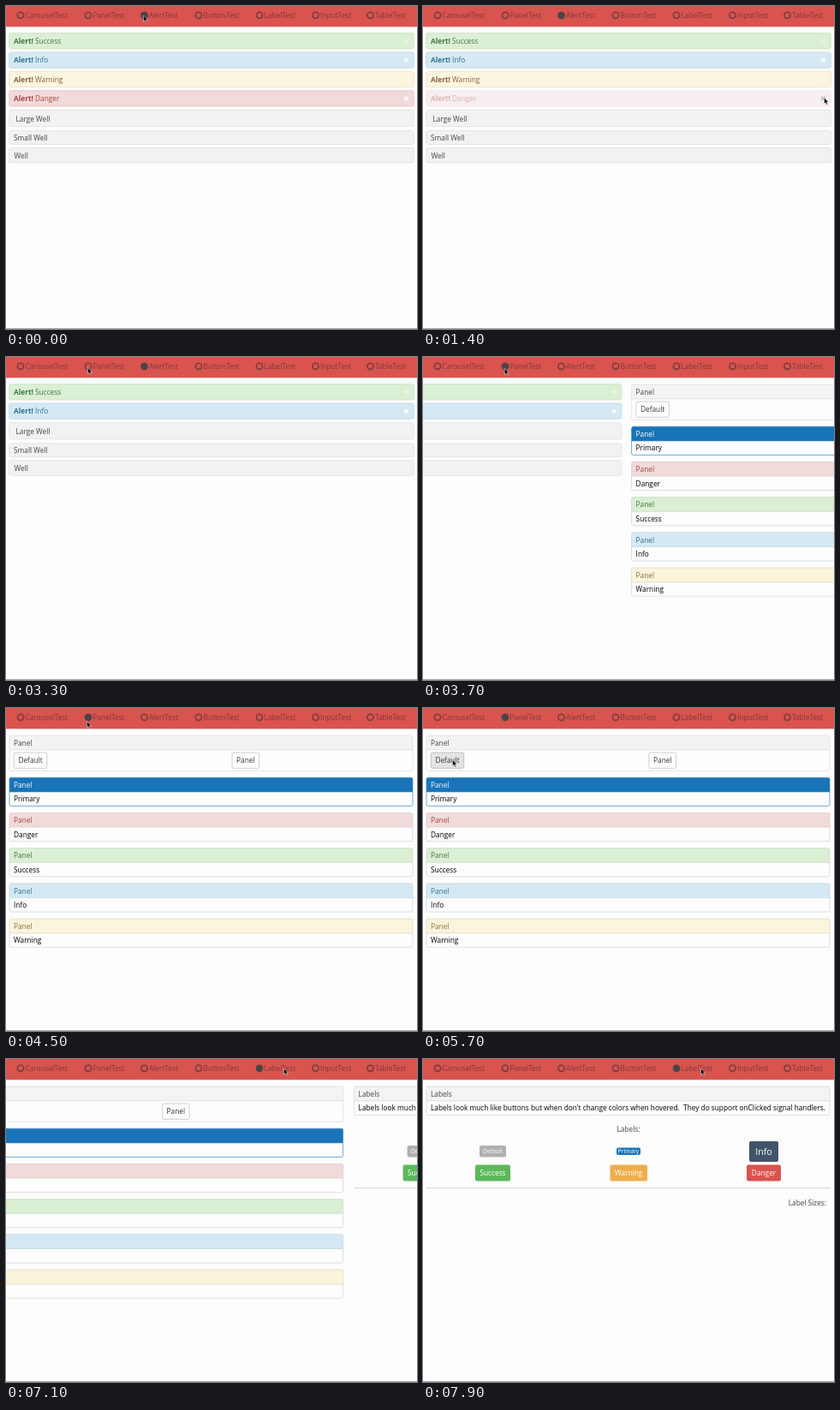
Write an HTML page that moves like this. It is 480 by 377 pixels and loops after 8 s.

```html
<!DOCTYPE html>
<html lang="en">
<head>
<meta charset="utf-8">
<style>
html, body { margin: 0; width: 100%; height: 100%; overflow: hidden; background: #fdfdfd; }
svg { display: block; width: 480px; height: 377px; font: 8.3px "Open Sans", sans-serif; }
text { white-space: pre; }
</style>
</head>
<body>
<svg id="stage" viewBox="0 0 480 377"></svg>
<script>
const LOOP = 8000, PITCH = 484, ROW = 22.35, HAIR = 0.7;
const stage = document.getElementById('stage');

function add(parent, tag, attrs = {}, text = '') {
  const el = document.createElementNS('http://www.w3.org/2000/svg', tag);
  for (const key in attrs) el.setAttribute(key, attrs[key]);
  el.textContent = text;
  parent.append(el);
  return el;
}
const group = parent => add(parent, 'g');
const box = (g, x, y, width, height, fill, stroke = 'none', rx = 2) =>
  add(g, 'rect', { x, y, width, height, fill, stroke, rx, 'stroke-width': HAIR });
const label = (g, x, mid, text, fill = '#444', extra = {}) =>
  add(g, 'text', { x, y: mid + 3, fill, ...extra }, text);
const move = (g, x, y) => g.setAttribute('transform', `translate(${x} ${y})`);

// Alert page
const alertPage = group(stage);
const alerts = [
  ['Success', '#dbefd5', '#c8dfba', '#3c763d', 0.4],
  ['Info', '#d5e9f4', '#b3d8e6', '#31708f', 1],
  ['Warning', '#fbf5df', '#f0e0bc', '#8a5f3b', 0.5],
  ['Danger', '#f0dada', '#e2bfc5', '#a94442', 1]
].map(([name, fill, edge, ink, crossAlpha], i) => {
  const g = group(alertPage), mid = 41 + ROW * i;
  box(g, 3.7, mid - 9.4, 472.6, 18.4, fill, edge);
  const line = label(g, 9, mid, '', ink);
  add(line, 'tspan', { 'font-weight': 700 }, 'Alert!');
  add(line, 'tspan', {}, ' ' + name);
  const cross = add(g, 'path', {
    d: `M465.3 ${mid - 2.2}l4.4 4.4m0 -4.4l-4.4 4.4`,
    stroke: '#fff', 'stroke-width': 1.6, opacity: crossAlpha
  });
  return { g, cross, mid };
});
const wells = group(alertPage);
[['Large Well', 11.5, 121.5, 19, 131.5], ['Small Well', 9, 145.5, 16, 153.7], ['Well', 9.5, 165.5, 17.5, 174.5]]
  .forEach(([text, x, y, h, mid]) => {
    box(wells, 3.7, y, 472.6, h, '#f2f2f2', '#dedede');
    label(wells, x, mid, text);
  });

// Panels
function panel(g, y, h, title, fill, edge, ink, body) {
  add(g, 'path', { d: `M4 ${y + 16.7}V${y + 2}q0 -2 2 -2h467q2 0 2 2v14.7z`, fill });
  add(g, 'path', { d: `M4 ${y + 16.7}h471`, stroke: edge, 'stroke-width': HAIR });
  box(g, 4, y, 471, h, 'none', edge);
  label(g, 9, y + 8.8, title, ink);
  if (body) label(g, 9, y + 25.1, body, '#000');
}
const panelPage = group(stage);
panel(panelPage, 32.2, 41.2, 'Panel', '#f3f3f3', '#dcdcdc', '#444');
const buttons = [['Default', 9.3, 38.4], ['Panel', 264, 31.5]].map(([text, x, w]) => {
  const rect = box(panelPage, x, 52.1, w, 18.2, '#fff', '#bbb');
  label(panelPage, x + w / 2, 61, text, '#333', { 'text-anchor': 'middle' });
  return { rect, x, w };
});
[
  ['Primary', '#1974b8', '#3787c4', '#fff'],
  ['Danger', '#f0dada', '#dacccc', '#a94442'],
  ['Success', '#dbefd5', '#cbd8c5', '#3c763d'],
  ['Info', '#d5e9f4', '#c3d5dd', '#31708f'],
  ['Warning', '#faf4dd', '#ddd6c2', '#8a6d3b']
].forEach(([name, fill, edge, ink], i) =>
  panel(panelPage, 81.2 + 41.2 * i, 33.2, 'Panel', fill, edge, ink, name));

// Labels
const labelPage = group(stage);
panel(labelPage, 32.2, 33.2, 'Labels', '#f3f3f3', '#d6d6d6', '#444',
  "Labels look much like buttons but when don't change colors when hovered.  They do support onClicked signal handlers.");
label(labelPage, 240, 82.3, 'Labels:', '#444', { 'text-anchor': 'middle' });
[
  ['Default', 66, 101, 31, 13.5, '#b0b0b0', 6.7],
  ['Primary', 226, 103.5, 28, 8.5, '#1974b8', 6.7],
  ['Info', 381, 96, 34, 24, '#41546a', 10.7],
  ['Success', 61, 123.5, 41, 19, '#5cb85c', 8.3],
  ['Warning', 218.5, 123.5, 43.5, 19, '#f0ad4e', 8.3],
  ['Danger', 378, 123.5, 40, 19, '#d9534f', 8.3]
].forEach(([text, x, y, w, h, fill, size]) => {
  box(labelPage, x, y, w, h, fill);
  add(labelPage, 'text', {
    x: x + w / 2, y: y + h / 2 + size * 0.36, fill: '#fff', 'text-anchor': 'middle', 'font-size': size
  }, text);
});
add(labelPage, 'path', { d: 'M4 150.5h472', stroke: '#d8d8d8' });
label(labelPage, 471, 167.5, 'Label Sizes:', '#444', { 'text-anchor': 'end' });

// Navigation bar
box(stage, 0, 0, 480, 24.3, '#d9534f', 'none', 0);
const tabs = [['Carousel', 17], ['Panel', 96], ['Alert', 161.5], ['Button', 225], ['Label', 296], ['Input', 361.5], ['Table', 425.5]]
  .map(([name, cx]) => {
    label(stage, cx + 5.5, 11, name + 'Test', '#7b3b3b');
    return add(stage, 'circle', { cx, cy: 10.8, r: 3.6, stroke: '#743c3d', 'stroke-width': 1.6 });
  });
add(stage, 'path', { d: 'M0 376.5h480', stroke: '#a0a0a0' });

const cursor = add(stage, 'path', {
  d: 'M0 0V7.2L1.6 5.7 2.8 8.2 4 7.7 2.9 5.3H5.2Z', stroke: '#fff', 'stroke-width': 0.5
});

// Pointer stops: time, x, y
const stops = [
  [0, 160.5, 11], [100, 160.5, 11], [350, 10, 62], [600, 180, 126], [900, 457, 121],
  [1100, 468.5, 107], [1650, 468.5, 107], [1950, 467, 84], [2350, 467, 84],
  [2750, 280, 0], [3150, 95.5, 12.5], [3600, 95.5, 12.5], [3900, 94.5, 15.5], [4600, 94.5, 15.5],
  [4850, 34.5, 60.5], [5150, 280, 60], [5400, 326, 125], [5650, 34.5, 60.5], [5850, 34.5, 60.5],
  [6300, 318, 8], [6600, 324.5, 11], [LOOP, 324.5, 11]
];
const clamp = v => Math.max(0, Math.min(1, v));

function pointer(t) {
  const i = stops.findIndex(s => s[0] > t);
  const [t0, x0, y0] = stops[i - 1], [t1, x1, y1] = stops[i];
  const k = (t - t0) / (t1 - t0), e = k * k * (3 - 2 * k);
  return [x0 + (x1 - x0) * e, y0 + (y1 - y0) * e];
}
function slide(t, start) {
  const k = clamp((t - start) / 400);
  return k < 0.5 ? 2 * k * k : 1 - 2 * (1 - k) ** 2;
}

function draw(now) {
  const t = now % LOOP;
  const [x, y] = pointer(t);
  const toPanel = slide(t, 3500), toLabel = slide(t, 6985);

  move(cursor, x, y);
  move(alertPage, -PITCH * toPanel, 0);
  move(panelPage, PITCH * (1 - toPanel - toLabel), 0);
  move(labelPage, PITCH * (1 - toLabel), 0);

  const dangerGone = clamp((t - 1160) / 400), warningGone = clamp((t - 2060) / 400);
  alerts[3].g.setAttribute('opacity', 1 - dangerGone);
  alerts[2].g.setAttribute('opacity', 1 - warningGone);
  move(wells, 0, -ROW * ((dangerGone === 1) + (warningGone === 1)));
  for (const a of alerts) {
    const over = x > 463 && Math.abs(y - a.mid) < 6;
    a.cross.setAttribute('stroke', over ? '#555' : '#fff');
  }

  for (const b of buttons) {
    const over = toPanel === 1 && x > b.x && x < b.x + b.w && y > 52 && y < 71;
    b.rect.setAttribute('fill', over ? '#e4e4e4' : '#fff');
    b.rect.setAttribute('stroke', over ? '#aaa' : '#bbb');
  }

  const active = t < 3450 ? 2 : t < 6950 ? 1 : 4;
  tabs.forEach((tab, i) => {
    tab.setAttribute('fill', i === active ? '#4b4547' : 'none');
    tab.setAttribute('stroke', i === active ? '#4b4547' : '#743c3d');
  });
}

const begin = performance.now();
function tick() {
  draw(performance.now() - begin);
  requestAnimationFrame(tick);
}
tick();
</script>
</body>
</html>
```
